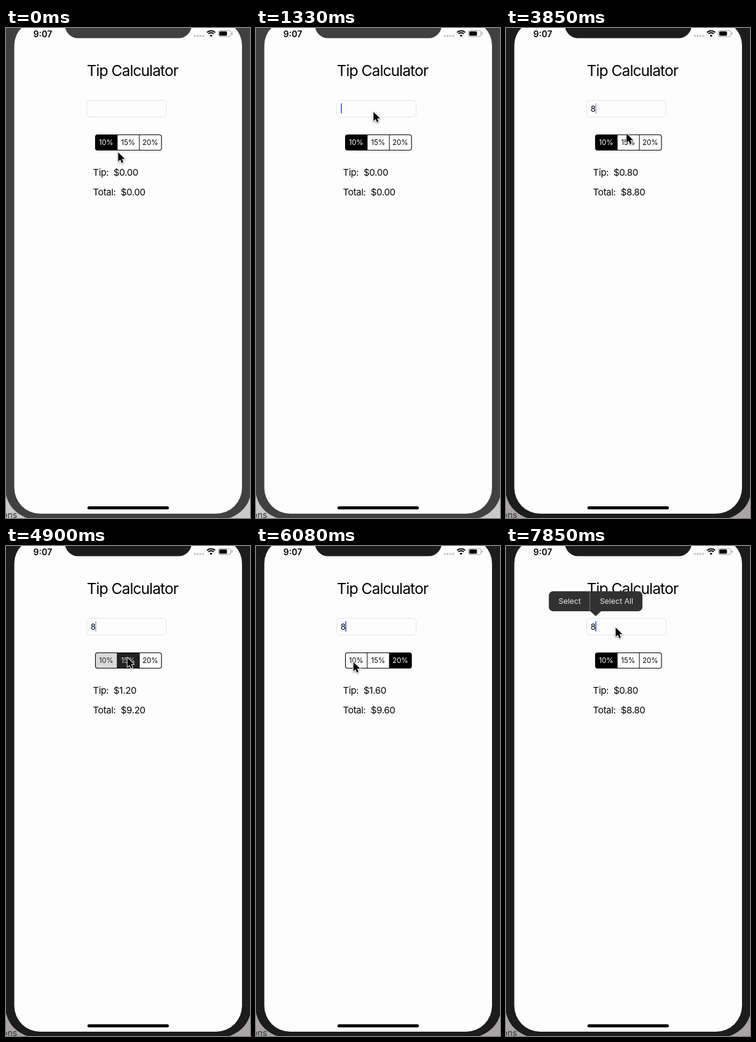
Recreate the animation shown at these times as an HTML page with a canvas. Size 397 px wide and 796 px high, loop 8 s.

```html
<!DOCTYPE html>
<html lang="en">
<head>
<meta charset="utf-8">
<title>Tip Calculator</title>
<style>
  html, body { margin: 0; width: 100%; height: 100%; overflow: hidden; }
  canvas { display: block; width: 397px; height: 796px; }
</style>
</head>
<body>
<canvas id="stage" width="397" height="796"></canvas>
<script>
const ctx = document.getElementById('stage').getContext('2d');
const LOOP = 8000, STEPS = 54, STEP_MS = LOOP / STEPS;
const TYPED = 20, FOCUSED = 10, MENU = 51;
const FONT = 'Inter, "Open Sans", sans-serif';

// [step, x, y] of the pointer tip
const pointerKeys = [
  [4, 182.5, 202], [8, 191.5, 138.5], [11, 190.5, 131.5], [22, 190.5, 131.5],
  [27, 197.5, 181.5], [33, 197.5, 181.5], [37, 235.5, 182.5], [38, 235.5, 182.5],
  [41, 158.5, 188.5], [43, 158.5, 188.5], [45, 160, 182], [46, 172.5, 148.5],
  [48, 178.5, 132.5]
];

// [step, segment] of each selection
const selections = [[-9, 0], [32, 1], [38, 2], [43, 0]];
const rates = [10, 15, 20];
const edges = [145.5, 181, 217, 253];

function box(x, y, w, h, r, fill, stroke, line = 1) {
  ctx.beginPath();
  ctx.roundRect(x, y, w, h, r);
  if (fill) { ctx.fillStyle = fill; ctx.fill(); }
  if (stroke) { ctx.strokeStyle = stroke; ctx.lineWidth = line; ctx.stroke(); }
}

function label(text, x, y, size, { color = '#000', weight = 400, spacing = 0, align = 'left' } = {}) {
  ctx.font = `${weight} ${size}px ${FONT}`;
  ctx.letterSpacing = spacing + 'px';
  ctx.textAlign = align;
  ctx.fillStyle = color;
  ctx.fillText(text, x, y);
}

function polygon(points) {
  ctx.beginPath();
  points.forEach(([x, y]) => ctx.lineTo(x, y));
  ctx.closePath();
}

const gray = v => `rgb(${v},${v},${v})`;

function pointerAt(n) {
  const next = pointerKeys.findIndex(k => k[0] >= n);
  if (next === 0) return pointerKeys[0].slice(1);
  if (next < 0) return pointerKeys[pointerKeys.length - 1].slice(1);
  const a = pointerKeys[next - 1], b = pointerKeys[next];
  const p = (n - a[0]) / (b[0] - a[0]);
  return [a[1] + (b[1] - a[1]) * p, a[2] + (b[2] - a[2]) * p];
}

function caretAlpha(n) {
  const blink = start => [1, 1, 1, 0.5, 0, 0, 0.5][(n - start) % 7];
  if (n < 2) return 0;
  if (n < 9) return n === 8 ? 0.4 : blink(2);
  if (n < 14) return 1;
  if (n < TYPED) return blink(14);
  if (n < 50) return blink(TYPED);
  return [0.5, 0, 0.5, 1][n - 50];
}

function drawPhone(active) {
  ctx.fillStyle = active ? '#aaa5a5' : '#cbc8c8';
  ctx.fillRect(0, 0, 397, 796);
  label('ons', -6, 796, 14, { color: '#333' });
  const bezel = active ? '#1c1c1c' : '#404040';
  box(-1, -80, 400, 878, 50, bezel);
  box(13.5, -12, 370.5, 801, [40, 40, 42, 42], '#fdfdfd');
  box(96, -30, 206, 46.5, 21, bezel);
  box(132.5, 777, 132.5, 5, 2.5, '#000');
}

function drawStatusBar() {
  label('9:07', 44.5, 14.5, 14, { weight: 600 });
  for (let i = 0; i < 4; i++) box(305.5 + i * 4.5, 11.3, 3.3, 3.2, 1, '#c9c9c9');

  ctx.strokeStyle = '#000';
  ctx.lineWidth = 2;
  for (const r of [9.3, 6]) {
    ctx.beginPath();
    ctx.arc(333.7, 13.8, r, -Math.PI * 0.75, -Math.PI * 0.25);
    ctx.stroke();
  }
  ctx.beginPath();
  ctx.moveTo(333.7, 14.5);
  ctx.arc(333.7, 14.3, 3.2, -Math.PI * 0.75, -Math.PI * 0.25);
  ctx.fillStyle = '#000';
  ctx.fill();

  box(345.5, 4, 20.5, 10, 3, null, '#a0a0a0');
  box(347, 5.5, 12.5, 7, 1.5, '#000');
  box(367.2, 7.2, 1.4, 3.6, 0.7, '#a0a0a0');
}

function drawSegments(n, current, previous, start) {
  const fade = [0.4, 0.86][n - start] ?? 1;
  rates.forEach((rate, i) => {
    const x = edges[i], w = edges[i + 1] - x;
    const dark = i === current ? fade : i === previous ? 1 - fade : 0;
    const corners = [[3.5, 0, 0, 3.5], 0, [0, 3.5, 3.5, 0]][i];
    box(x, 173.5, w, 25, corners, gray(Math.round(253 * (1 - dark))));
    label(rate + '%', x + w / 2 - 0.3, 190.3, 11.5, {
      color: gray(Math.round(255 * dark)), align: 'center'
    });
  });
  box(145.5, 173.5, 107.5, 25, 3.5, null, '#000', 1.1);
  ctx.fillStyle = '#000';
  for (const x of edges.slice(1, 3)) ctx.fillRect(x - 0.5, 173.5, 1, 25);
}

function drawField(n) {
  box(131.5, 117.5, 129, 27, 5, null, '#e4e4e4');
  const typed = n >= TYPED;
  if (typed) label('8', 137.8, 135.5, 13);
  ctx.globalAlpha = caretAlpha(n);
  ctx.fillStyle = '#4459e0';
  ctx.fillRect(typed ? 145.3 : 138, 122.3, 1.7, 16.5);
  ctx.globalAlpha = 1;
}

function drawMenu(n) {
  if (n < MENU) return;
  ctx.globalAlpha = [0.35, 0.85, 1][n - MENU];
  box(69.7, 73.5, 152.3, 32.5, 7, '#313131');
  polygon([[137, 105.8], [155, 105.8], [146, 114]]);
  ctx.fill();
  ctx.fillStyle = '#8a8a8a';
  ctx.fillRect(136.2, 73.5, 0.8, 32.5);
  const style = { color: '#e8e8e8', align: 'center' };
  label('Select', 103.7, 94.3, 12.3, style);
  label('Select All', 179.8, 94.3, 12.3, style);
  ctx.globalAlpha = 1;
}

function drawPointer([x, y]) {
  ctx.save();
  ctx.translate(x, y);
  polygon([[0, 0], [0, 15], [3.4, 11.8], [5.8, 17.2], [8.3, 16.1], [6, 10.8], [10.7, 10.6]]);
  ctx.shadowColor = 'rgba(0,0,0,0.4)';
  ctx.shadowBlur = 3;
  ctx.shadowOffsetY = 1;
  ctx.strokeStyle = '#fff';
  ctx.lineWidth = 2;
  ctx.lineJoin = 'round';
  ctx.stroke();
  ctx.shadowColor = 'transparent';
  ctx.fillStyle = '#000';
  ctx.fill();
  ctx.restore();
}

function draw(n) {
  const index = selections.filter(s => s[0] <= n).length - 1;
  const [start, current] = selections[index];
  const previous = index ? selections[index - 1][1] : -1;
  const bill = n >= TYPED ? 8 : 0;
  const tip = bill * rates[current] / 100;
  const money = v => '$' + v.toFixed(2);
  const body = { spacing: -0.3 };

  drawPhone(n >= FOCUSED);
  drawStatusBar();
  label('Tip Calculator', 131.5, 78, 24.5, { spacing: -0.9 });
  drawField(n);
  drawSegments(n, current, previous, start);
  label('Tip:', 141.5, 239.5, 15, body);
  label(money(tip), 175, 239.5, 15, body);
  label('Total:', 141.5, 271.5, 15, body);
  label(money(bill + tip), 186.7, 271.5, 15, body);
  drawMenu(n);
  drawPointer(pointerAt(n));
}

function tick() {
  const time = performance.now() % LOOP;
  draw(Math.min(STEPS - 1, Math.floor((time + 7) / STEP_MS)));
  requestAnimationFrame(tick);
}
tick();
</script>
</body>
</html>
```
